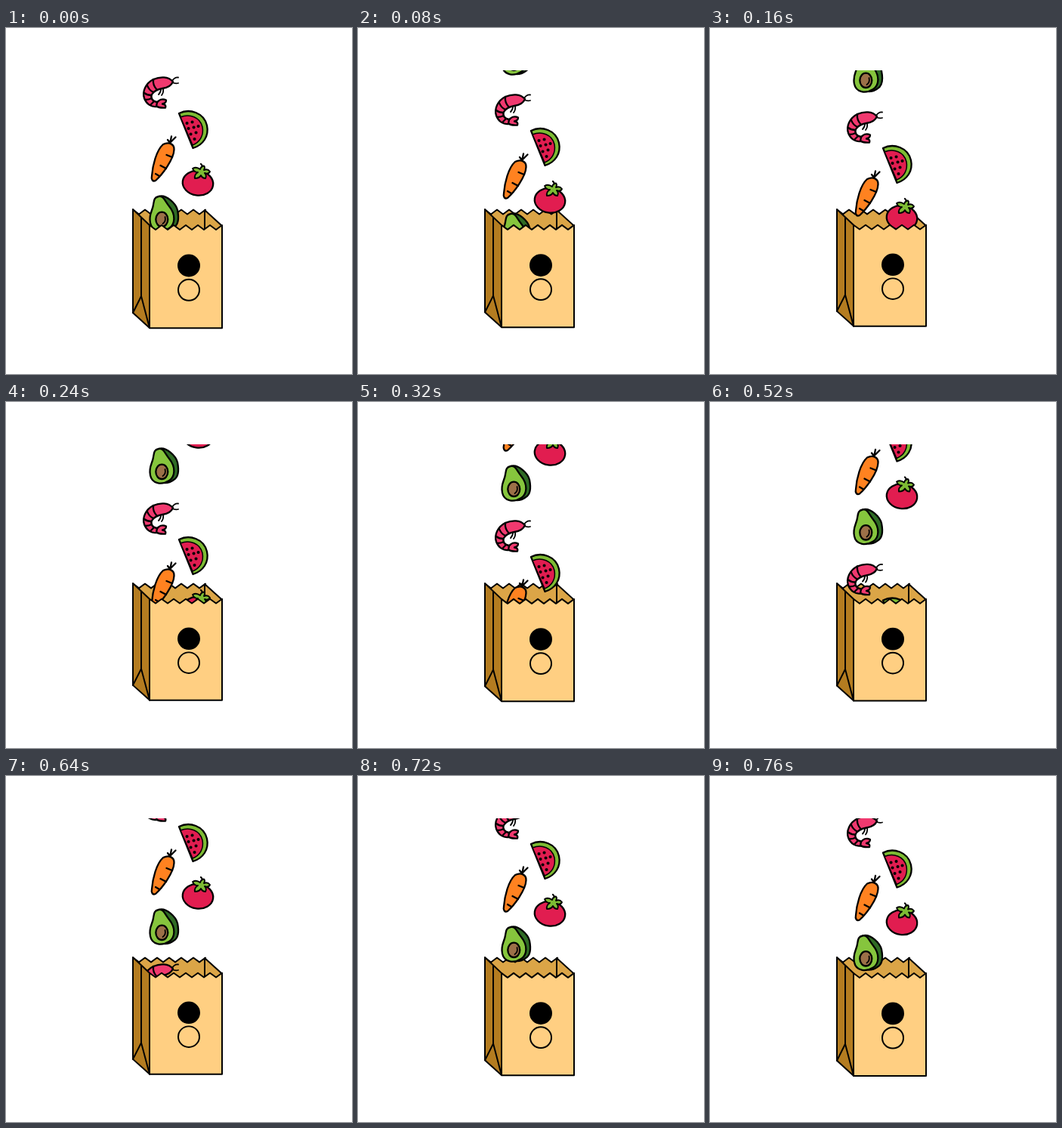
An HTML page that plays this animation: 458x458 px, repeating every 800 ms.

```html
<!DOCTYPE html>
<html lang="en">
<head>
<meta charset="utf-8">
<title>Grocery bag</title>
<style>
  html, body { margin: 0; width: 100%; height: 100%; overflow: hidden; background: #fff; }
  svg { display: block; width: 100%; height: 100%; }
  .line { fill: none; }
</style>
</head>
<body>
<svg viewBox="0 0 458 458" stroke="#000" stroke-width="2" stroke-linecap="round" stroke-linejoin="round">
  <defs>
    <clipPath id="window"><rect x="160" y="56" width="140" height="318"/></clipPath>

    <g id="food" stroke-width="2.300">
      <g id="shrimp" fill="#f0396f">
        <path class="line" d="M220 70C222 67 225 65 228 65.500M220 72Q224 74 228 73M205 81Q205 85 202 88M208 80Q209 85 206 89" stroke-width="1.800"/>
        <path d="M199 100C202 95 207 93 212 95.500C212 99 210 100 207 100.500C211 101 212 103 211 105.500C206 106 201 105 198 103Z"/>
        <path d="M221 71C215 64 204 64 195 68C185 73 180 84 183 93C186 101 193 105 199 104L200 98C194 97 191 93 193 88C196 83 201 81 207 80C214 79 219 76 221 71Z"/>
        <path class="line" d="M195 68Q194 76 200 82M187 76Q189 82 195 85M183 86Q187 89 192 89M184 95Q189 95 193 93M191 102L196 97"/>
      </g>

      <g id="melon">
        <path fill="#7dbb33" d="M229 113C243 106 262 112 266 129C269 143 261 155 247.500 159Z"/>
        <path fill="#e11d50" stroke-width="1.500" d="M231 118C243 113 257 118 260 131C262 142 257 151 247 155Z"/>
        <path class="line" stroke-width="4" d="M239.500 126h.1M246.500 124.500h.1M241.500 133h.1M248.500 131.500h.1M254.500 130h.1M244.500 140.500h.1M251.500 138.500h.1M249.500 147h.1"/>
      </g>

      <g id="carrot">
        <path class="line" d="M217 153L219 143.500M217 152L214 148M218 151L224.500 144.500"/>
        <path fill="#ff8220" d="M208 154C216 150 223 154 222.500 161C222 174 207 194 198 202C194 204 192 200 193 196C194 182 199 162 208 154Z"/>
        <path class="line" d="M220 171L212.500 168M212 186L204.500 182M203 196L198 193"/>
      </g>

      <g id="tomato">
        <ellipse fill="#e11d50" cx="254" cy="205.300" rx="20.300" ry="16.300" transform="rotate(8 254 205.300)"/>
        <path class="line" d="M259 188Q261.500 183 258 180"/>
        <path fill="#7dbb33" stroke-width="1.900" d="M257 187Q252 183 247 186Q249 191 254 191Q249 194 250 199Q256 199 258 195Q260 199 264 199Q266 195 263 192Q268 194 270 190Q267 186 262 188Q264 184 262 182.500Q258 183 257 187Z"/>
      </g>

      <g id="avocado">
        <path fill="#2f6b25" d="M202 223C213 220 225 233 227 241C229 251 229 260 222 264Q217 268 210 268Z"/>
        <path fill="#86c53d" d="M202 223C209 222 210 229 216 236C225 247 224 260 216 265C206 271.500 193 269 191 258C188.500 247 194 242 195 234C196 228 196 224 202 223Z"/>
        <ellipse fill="#9c7048" cx="206.300" cy="253.300" rx="8" ry="9.700"/>
        <path class="line" stroke-width="1.800" d="M210.500 250Q212 256 207.500 259"/>
      </g>
    </g>
  </defs>

  <g class="bag">
    <path id="back" fill="#dba547"/>
    <path fill="#dba547" d="M263 241L286 262V275H263Z"/>
  </g>

  <g clip-path="url(#window)">
    <g id="fall">
      <use href="#food"/>
      <use href="#food" y="-230"/>
    </g>
  </g>

  <g class="bag">
    <path fill="#b47c20" d="M168 240L190 261V397L168 377Z"/>
    <path class="line" d="M179 251V355M168 377L179 355L190 397"/>
    <path id="front" fill="#ffcf82"/>
    <circle cx="242" cy="314.500" r="14"/>
    <circle cx="242" cy="346.800" r="14" fill="none"/>
  </g>
</svg>

<script>
  const LOOP = 800, STEP = 40, DROP = 230;
  const bags = document.querySelectorAll('.bag');
  const fall = document.getElementById('fall');

  // Six-toothed torn edge, closed by straight sides down to the base.
  function panel(id, x, y, base) {
    const teeth = 'l8 6l8 -6'.repeat(6);
    document.getElementById(id).setAttribute('d', `M${x} ${y}${teeth}V${base}H190L${x} ${y}Z`);
  }
  panel('back', 168, 240.5, 270);
  panel('front', 190, 261, 397.2);

  function draw(now) {
    const t = Math.floor((now % LOOP) / STEP) * STEP / LOOP;
    fall.setAttribute('transform', `translate(0 ${DROP * t})`);
    const squash = 1 - 0.0085 * (1 - Math.cos(4 * Math.PI * t));
    for (const bag of bags) {
      bag.setAttribute('transform', `translate(0 240) scale(1 ${squash}) translate(0 -240)`);
    }
  }

  const start = performance.now();
  function tick() {
    draw(performance.now() - start);
    requestAnimationFrame(tick);
  }
  tick();
</script>
</body>
</html>
```
